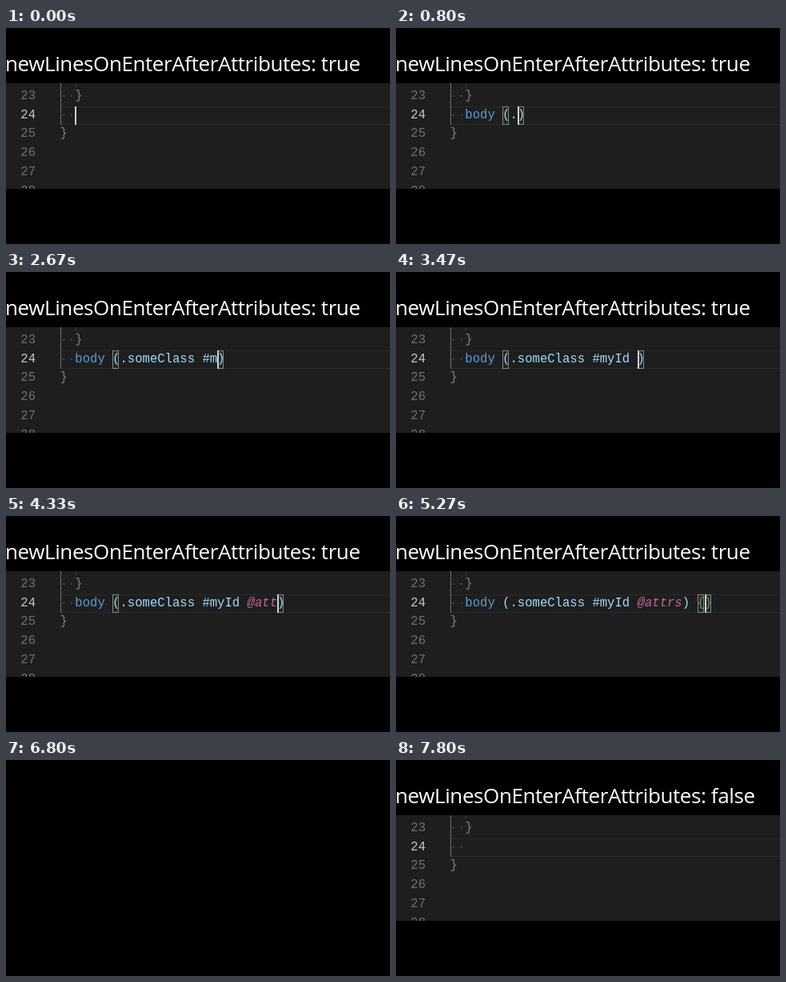
Animation, 480 px wide and 270 px high, one loop 8 s. Source, as an HTML page:

```html
<!DOCTYPE html>
<html lang="en">
<head>
<meta charset="utf-8">
<title>newLinesOnEnterAfterAttributes</title>
<style>
  html, body { margin: 0; width: 100%; height: 100%; overflow: hidden; background: #000; }
  #stage { position: relative; width: 480px; height: 270px; overflow: hidden; background: #000; }
  #title {
    position: absolute; left: -1px; top: 26px; line-height: 36px; white-space: pre;
    font-family: "Open Sans", "Noto Sans", sans-serif; font-size: 26px; letter-spacing: -.4px; color: #fff;
  }
  #editor {
    position: absolute; left: 0; top: 69px; width: 480px; height: 132px; overflow: hidden;
    background: #1e1e1e; color: #808080;
    font: 15.6px/23.8px "Liberation Mono", "DejaVu Sans Mono", monospace;
  }
  #editor div { position: absolute; white-space: pre; height: 23.8px; }
  #editor .num { left: 0; width: 37px; text-align: right; color: #6f6f6f; }
  #editor .num.on { color: #c6c6c6; }
  #editor .current { left: 69px; right: -2px; box-sizing: border-box; border: solid #292929; border-width: 1px 0; }
  #editor .guide { width: 1px; background: #404040; }
  #editor .guide.active { background: #707070; }
  #editor .match { width: 8px; box-sizing: border-box; border: 1px solid #858585; background: #1d2a1d; }
  #editor .caret { width: 2px; background: #d0d0d0; }
  .dot { color: #454545; }
  .tag { color: #569cd6; }
  .attr { color: #9cdcfe; }
  .mixin { color: #c563a2; font-style: italic; }
</style>
</head>
<body>
<div id="stage">
  <div id="title"></div>
  <div id="editor"></div>
</div>
<script>
const LOOP = 8000, LEFT = 67.6, CHAR = 9.36, LINE = 23.8;
const ENTER = 5670, SPLIT = 5800, BLINK = 6330, BLACK = 6800, RESTART = 7800;
const rule = "body (.someClass #myId @attrs) {";
// One time per typed character of the rule.
const times = [130, 200, 330, 400, 470, 600, 730, 870, 930, 1070, 1200, 1400, 1600, 1670, 1800, 1930,
  2070, 2270, 2670, 2870, 3130, 3330, 3470, 3670, 4070, 4130, 4330, 4470, 4670, 4870, 4930, 5130];

const title = document.getElementById("title");
const editor = document.getElementById("editor");
const colX = col => LEFT + col * CHAR;
const rowY = row => 28.6 + (row - 24) * LINE;
const box = (kind, x, row, text = "") =>
  `<div class="${kind}" style="${x === null ? "" : `left:${x}px;`}top:${rowY(row)}px">${text}</div>`;
const span = (kind, text) => text && `<span class="${kind}">${text}</span>`;
const indent = n => span("dot", "·".repeat(n));

function colorize(text) {
  return span("tag", text.slice(0, 4)) + span("attr", text.slice(4, 23)) +
    text.slice(23).replace(/\)/, s => span("attr", s)).replace(/^@\w*/, s => span("mixin", s));
}

function stateAt(t) {
  const typed = t >= RESTART ? 0 : times.filter(time => time <= t).length;
  const text = rule.slice(0, typed);
  const state = { lines: [], row: 24, col: 2 + typed, matches: [], caret: t < BLINK };
  const add = (depth, code) => state.lines.push(indent(depth) + code);
  if (t >= SPLIT && t < RESTART) {
    add(2, colorize(rule.slice(0, 30)));
    add(2, "{");
    add(4, "");
    add(2, "}");
    state.row = 26;
    state.col = 4;
  } else if (t >= ENTER && t < RESTART) {
    add(2, colorize(rule));
    add(4, "");
    add(2, "}");
    state.row = 25;
    state.col = 4;
  } else {
    const open = typed > 5 && typed < 30;
    add(2, colorize(text + (open ? ")" : typed === 32 ? "}" : "")));
    if (open) state.matches = [7, state.col];
    if (typed === 30) state.matches = [7, 31];
    if (typed === 32) state.matches = [33, 34];
  }
  add(0, "}");
  return state;
}

function paint(t) {
  const { lines, row, col, matches, caret } = stateAt(t);
  let html = box("current", null, row);
  for (let n = 22; n <= 28; n++) html += box(n === row ? "num on" : "num", null, n, n);
  html += box("code", LEFT, 22, indent(4) + "min-pxy-color-bag;");
  html += box("code", LEFT, 23, indent(2) + "}");
  html += box("guide", 87, 22);
  const last = 24 + lines.length - 1;
  for (let n = 22; n < last; n++) html += box("guide active", 68, n);
  if (row > 24) html += box("guide", 87, row);
  for (const m of matches) html += box("match", colX(m) + .3, row);
  lines.forEach((line, i) => { html += box("code", LEFT, 24 + i, line); });
  if (caret) html += box("caret", Math.round(colX(col)), row);
  editor.innerHTML = html;
  title.textContent = "newLinesOnEnterAfterAttributes: " + (t >= RESTART ? "false" : "true");
}

const cues = [...times, ENTER, SPLIT, BLINK, BLACK, RESTART];
const start = performance.now();
let shown = -1;
function tick() {
  const t = (performance.now() - start) % LOOP;
  const step = cues.filter(cue => cue <= t).length;
  if (step !== shown) {
    shown = step;
    const dark = t >= BLACK && t < RESTART;
    title.hidden = editor.hidden = dark;
    if (!dark) paint(t);
  }
  requestAnimationFrame(tick);
}
tick();
</script>
</body>
</html>
```
